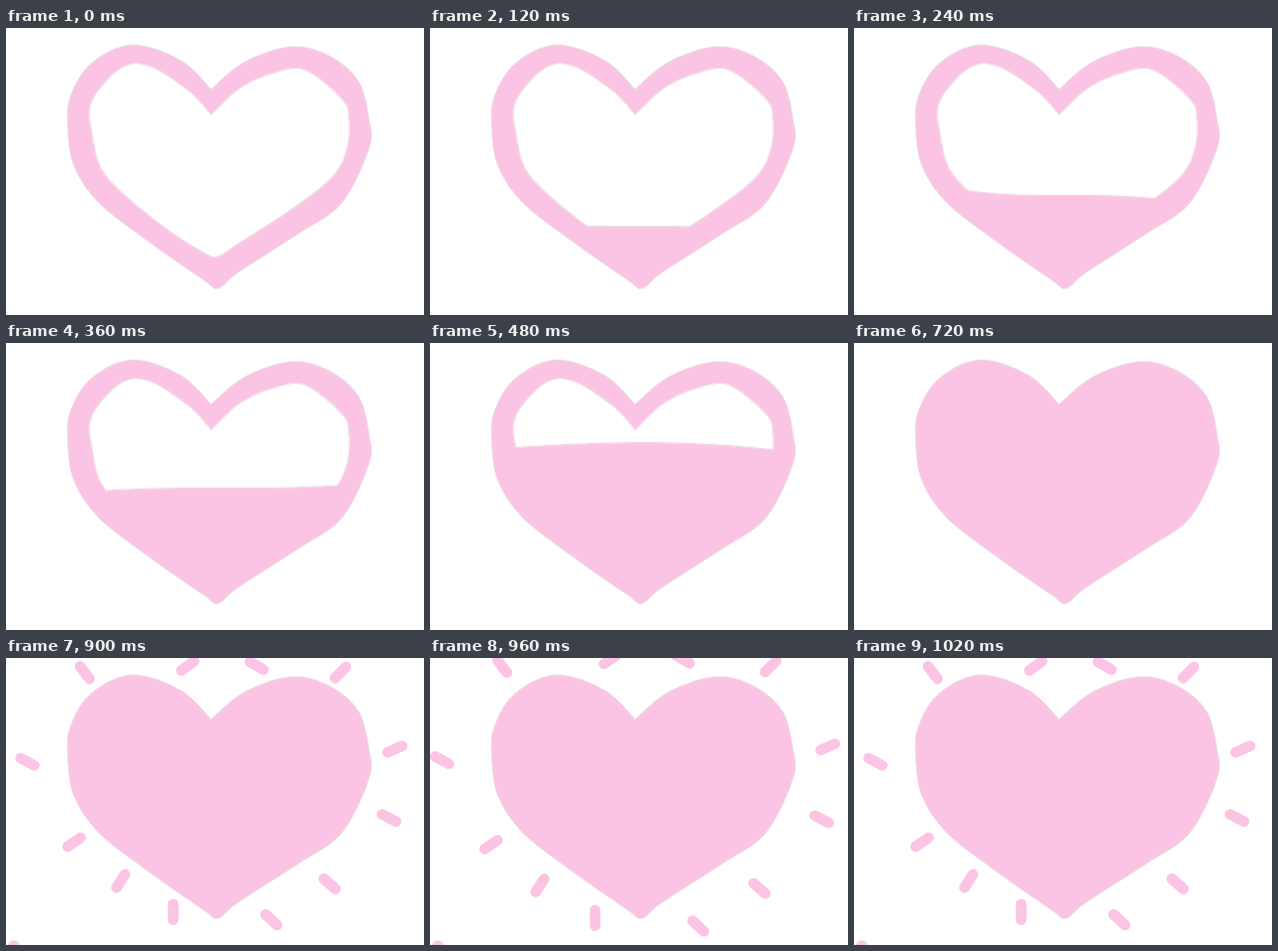
An HTML page with a canvas that plays this animation: 430x296 px, repeating every 1140 ms.

```html
<!DOCTYPE html>
<html lang="en">
<head>
<meta charset="utf-8">
<title>Filling heart</title>
<style>
html, body { margin: 0; width: 100%; height: 100%; overflow: hidden; background: #fff; }
canvas { display: block; }
</style>
</head>
<body>
<canvas id="stage" width="430" height="296"></canvas>
<script>
const ctx = document.getElementById('stage').getContext('2d');
const WHITE = '#fff', PINK = '#fcc4e4', RIM = '#e9dee4';
const LOOP = 1140, STEP = 60, FULL = 720, RAYS = 840;

const points = text => text.trim().split(/\s+/).map(p => p.split(',').map(Number));

// Catmull-Rom curve through the points, with a sharp notch at the first one.
function curve(text) {
  const p = points(text), path = new Path2D();
  p.push(p[0]);
  const at = i => p[Math.max(0, Math.min(i, p.length - 1))];
  const handle = (i, sign) => [0, 1].map(k => at(i)[k] + sign * (at(i + 1)[k] - at(i - 1)[k]) / 6);
  path.moveTo(...p[0]);
  for (let i = 1; i < p.length; i++) {
    path.bezierCurveTo(...handle(i - 1, 1), ...handle(i, -1), ...p[i]);
  }
  path.closePath();
  return path;
}

const outer = curve(`211,64 180,34 130,18 88,37 67,70 64,100 70,141 96,180 150,222
  203,259 218,268 238,252 300,212 345,180 373,124 373,95 362,55 330,28 292,20 245,36`);
const inner = curve(`211,89 190,66 148,39 118,41 88,75 88,108 102,152 155,200 205,233
  220,235 240,222 290,190 335,155 351,125 353,92 346,73 308,43 275,46 240,62`);

// Liquid surface: time, height, tilt, sag of the ends.
const surface = [
  [0, 237, 0, 0], [240, 173, 10, 0], [360, 150, -3.5, 0],
  [480, 103, 1, 6], [600, 71, -3, 3], [FULL, 36, 0, 0]
];

// Rays: centre and angle in degrees.
const rays = points(`81,15,53 187,8,-36 258,8,30 344,15,-45 400,94,-24 394,165,27
  333,233,41 273,270,43 172,262,90 118,230,-57 70,190,-35 22,107,28`);

function paint(path) {
  ctx.strokeStyle = RIM;
  ctx.lineWidth = 2;
  ctx.stroke(path);
  ctx.fillStyle = PINK;
  ctx.fill(path);
}

// The region above the liquid.
function air(t) {
  const i = surface.findIndex(key => key[0] > t);
  const from = surface[i - 1], to = surface[i];
  const k = (t - from[0]) / (to[0] - from[0]);
  const [, height, tilt, sag] = from.map((v, n) => v + (to[n] - v) * k);
  const path = new Path2D();
  path.moveTo(70, 0);
  for (let x = 70; x <= 370; x += 10) {
    const u = (x - 220) / 130;
    path.lineTo(x, height + tilt * u ** 3 + sag * u ** 2);
  }
  path.lineTo(370, 0);
  path.closePath();
  return path;
}

function drawHollow(t) {
  const above = air(t);
  ctx.save();
  ctx.clip(inner);
  ctx.clip(above);
  ctx.fillStyle = WHITE;
  ctx.fillRect(0, 0, 430, 296);
  ctx.strokeStyle = RIM;
  ctx.lineWidth = 2;
  ctx.stroke(inner);
  ctx.stroke(above);
  ctx.restore();
}

function drawRays(spread) {
  ctx.lineCap = 'round';
  ctx.lineWidth = 11;
  ctx.strokeStyle = PINK;
  ctx.beginPath();
  for (const [x, y, angle] of rays) {
    const cx = x + (x - 215) * spread, cy = y + (y - 140) * spread;
    const dx = 8 * Math.cos(angle * Math.PI / 180), dy = 8 * Math.sin(angle * Math.PI / 180);
    ctx.moveTo(cx - dx, cy - dy);
    ctx.lineTo(cx + dx, cy + dy);
  }
  ctx.stroke();
  const speck = new Path2D();
  speck.arc(8, 297, 5, 0, 7);
  paint(speck);
}

function draw(time) {
  const t = Math.min(Math.floor(time % LOOP / STEP) * STEP, LOOP - 2 * STEP);
  ctx.fillStyle = WHITE;
  ctx.fillRect(0, 0, 430, 296);
  paint(outer);
  if (t < FULL) drawHollow(t);
  if (t >= RAYS) drawRays((t - RAYS) / STEP % 2 ? 0 : 0.05);
}

let start;
function tick(now) {
  start ??= now;
  draw(now - start);
  requestAnimationFrame(tick);
}
draw(0);
requestAnimationFrame(tick);
</script>
</body>
</html>
```
